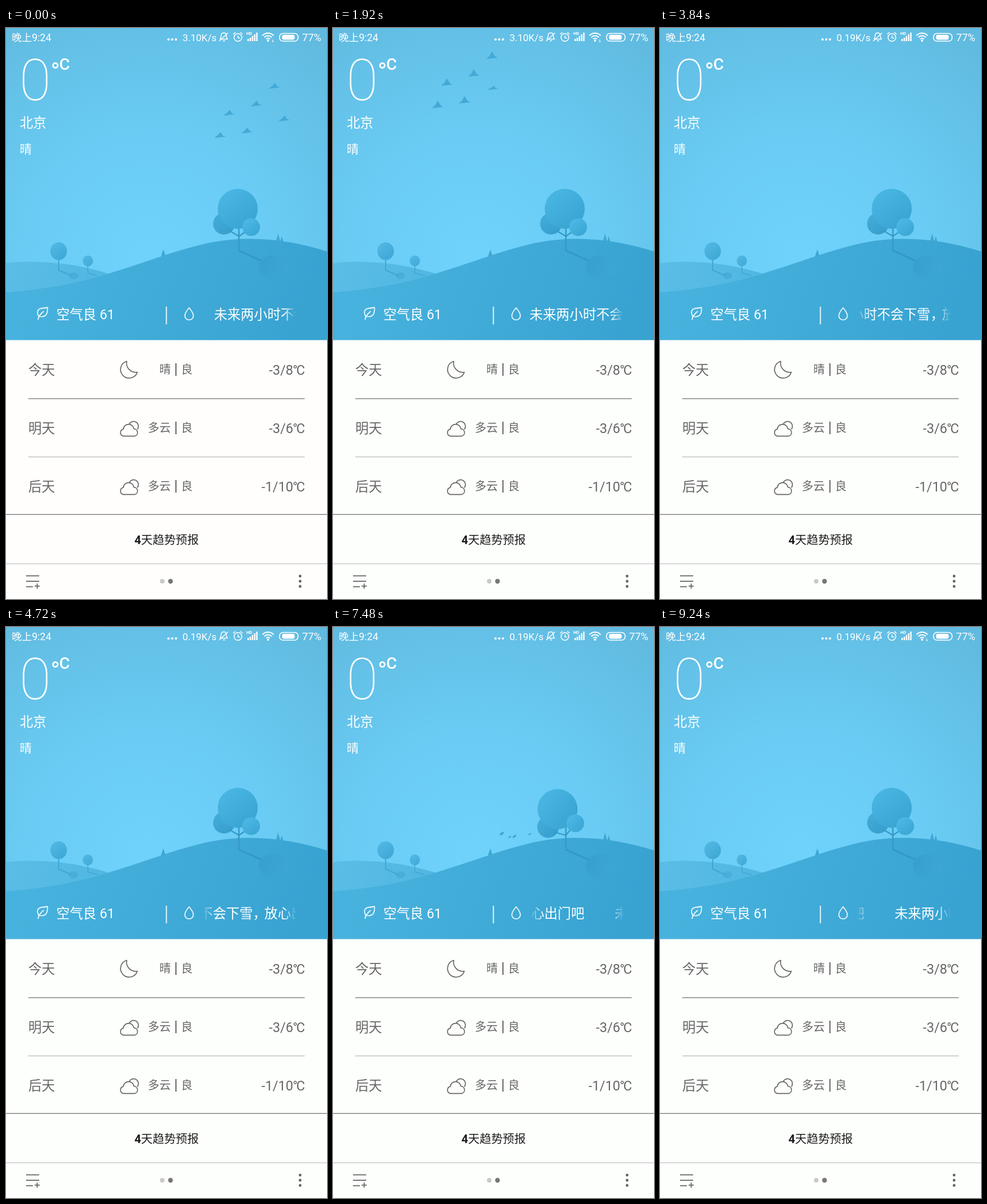
Recreate the animation shown at these times as an HTML page with a canvas. Size 561 by 998 pixels, loop 9.28 s.

```html
<!DOCTYPE html>
<html lang="zh">
<head>
<meta charset="utf-8">
<title>天气</title>
<style>
html, body { margin: 0; width: 100%; height: 100%; overflow: hidden; background: #fdfffc; }
canvas { display: block; width: 561px; height: 998px; }
</style>
</head>
<body>
<canvas id="stage" width="561" height="998"></canvas>
<script>
const LOOP = 9280, STEP = 40;
const FONT = "Roboto, 'Noto Sans CJK SC', 'Noto Sans CJK', sans-serif";
const stage = document.getElementById('stage');
const main = stage.getContext('2d');
const band = document.createElement('canvas');
band.width = 164; band.height = 44;
const bandCtx = band.getContext('2d');
let c = main;

const clamp = v => Math.max(0, Math.min(1, v));
const ease = v => { v = clamp(v); return v * v * (3 - 2 * v); };

function text(str, x, cy, size, color = '#fff', align = 'left', weight = 400) {
  c.font = `${weight} ${size}px ${FONT}`;
  c.textAlign = align;
  c.textBaseline = 'alphabetic';
  c.fillStyle = color;
  c.fillText(str, x, cy + size * 0.37);
}
function line(points, color, width = 2) {
  c.beginPath();
  points.forEach(([x, y]) => c.lineTo(x, y));
  c.strokeStyle = color;
  c.lineWidth = width;
  c.stroke();
}
function poly(points, color) {
  c.beginPath();
  points.forEach(([x, y]) => c.lineTo(x, y));
  c.fillStyle = color;
  c.fill();
}
function dot(x, y, r, color, ry = r) {
  c.beginPath();
  c.ellipse(x, y, r, ry, 0, 0, Math.PI * 2);
  c.fillStyle = color;
  c.fill();
}
function path(d, color, width) {
  c.strokeStyle = color;
  c.lineWidth = width;
  c.stroke(new Path2D(d));
}
function blend(x0, y0, x1, y1, from, to) {
  const g = c.createLinearGradient(x0, y0, x1, y1);
  g.addColorStop(0, from);
  g.addColorStop(1, to);
  return g;
}
function ball(x, y, r, from, to, ry = r) {
  dot(x, y, r, blend(x - r * .6, y - r * .8, x + r * .6, y + r * .8, from, to), ry);
}

function sky() {
  const g = c.createRadialGradient(250, 400, 20, 250, 400, 500);
  g.addColorStop(0, '#6fd2fb');
  g.addColorStop(.4, '#6accf4');
  g.addColorStop(1, '#60b9de');
  c.fillStyle = g;
  c.fillRect(0, 0, 561, 546);
}

const BIRDS = [[469, 101], [437, 132], [390, 148], [486, 158], [421, 179], [374, 187]];
function birds(t) {
  const age = Math.max(0, t - 520);
  if (age > 4000) return;
  BIRDS.forEach(([x, y], i) => {
    const lead = i === 3;
    const bx = x - age * (lead ? .1475 : .1365);
    const by = y - age * (.0242 + age * 9.75e-6) - (lead ? 4e-6 * Math.max(0, age - 1000) ** 2 : 0);
    const flap = Math.sin(age / 432 * Math.PI * 2) * (lead ? -1 : 1);
    const top = by - 5 - 2 * flap;
    poly([[bx - 10, by + 5 + flap], [bx - 4, by + .5], [bx + 1 - flap, top],
      [bx + 5, by + 1], [bx + 10, by + 3 + flap], [bx, by + 4 + flap]], '#43a9d6');
  });
}

function hills() {
  c.fillStyle = blend(0, 410, 170, 440, '#5abde6', '#51b7e2');
  c.fill(new Path2D('M0 411 C60 404 125 412 185 431 L185 470 H0Z'));
  const trunk = '#40a7d4';
  line([[92, 400], [92, 423], [114, 433]], trunk, 2);
  dot(118, 433, 8, 'rgba(62,166,211,.55)', 6);
  ball(92, 390, 14.5, '#50b7e3', '#40a8d6', 15.5);
  line([[143, 412], [143, 428], [160, 433]], trunk, 1.5);
  ball(143, 407, 9, '#50b7e3', '#43abd8', 9.5);

  const fir = (x, y, w, base) => poly([[x, y], [x + w, base], [x - w, base]], '#3fa6d3');
  fir(275, 387, 5, 402);
  fir(475.5, 359, 4.5, 376);
  fir(482, 364, 3.5, 376);
  c.fillStyle = blend(60, 400, 500, 560, '#48b2de', '#38a3d1');
  c.fill(new Path2D('M0 462 C70 457 130 445 180 429 C250 408 300 386.5 360 374.5 C430 361.5 500 371 561 390.5 V546 H0Z'));
}

const LEAVES = [[295, 361, 5], [309, 367, 3.2], [317, 366, 4.6], [344, 362, 3.2]];
function leaves(t) {
  if (t < 6500 || t > 8500) return;
  const age = t - 7480;
  LEAVES.forEach(([x, y, r], i) => {
    const lx = x - age * .09;
    if (lx > 380) return;
    c.save();
    c.globalAlpha = clamp((8500 - t) / 400);
    c.translate(lx, y + age * .014 + Math.sin(age / 260 + i) * 2 - Math.sin(i) * 2);
    c.rotate(-.65 + age * .0006);
    c.beginPath();
    c.moveTo(-r, 0);
    c.quadraticCurveTo(0, -r * .95, r, 0);
    c.quadraticCurveTo(0, r * .95, -r, 0);
    c.fillStyle = '#42a9d6';
    c.fill();
    c.restore();
  });
}

function bigTree(t) {
  const bark = '#3599c7';
  line([[407, 389], [447, 407]], 'rgba(48,148,194,.8)', 2.5);
  dot(468, 418, 26, blend(442, 400, 494, 425, '#369fcd', '#3ca6d4'), 21);
  const lean = ease((t - 5500) / 600) - ease((t - 8200) / 700);
  const rotated = draw => {
    c.save();
    c.translate(407, 365);
    c.rotate(-lean * Math.PI / 12);
    draw();
    c.restore();
  };
  rotated(() => ball(-26, -23, 19, '#42abd8', '#379fcd'));
  line([[407, 343], [407, 390]], bark, 2.5);
  rotated(() => {
    line([[-17, -11], [0, -1], [16, -12]], bark, 2.2);
    ball(-2, -49, 35, '#48b5e2', '#3aa4d2');
    ball(21.5, -17, 15.5, '#4bb7e4', '#3ca7d5');
  });
}

function statusBar(t) {
  const w = '#fff';
  text('晚上9:24', 10, 16.5, 17.6);
  [284, 290.5, 297].forEach(x => dot(x, 20, 2.1, w));
  text(t < 2440 ? '3.10K/s' : '0.19K/s', 368, 16.5, 17, w, 'right');

  path('M374 19.5 H387 Q385 17 385 13 Q385 8.5 380.5 8.5 Q376 8.5 376 13 Q376 17 374 19.5 M379 22.5 H383 M372.5 23 L388 8.5', w, 1.4);
  path('M398.5 16.5 a6.8 6.8 0 1 0 13.6 0 a6.8 6.8 0 1 0 -13.6 0 M405.5 13 V17.5 H409 M397 11 L401 7.5 M409.5 7.5 L413.5 11', w, 1.5);
  text('HD', 420, 9.5, 7.5, w, 'left', 700);
  for (let i = 0; i < 5; i++) {
    const h = [4, 6, 9, 12, 15][i];
    c.fillRect(422 + i * 3.8, 23 - h, 2.4, h);
  }
  [4.5, 9, 13.5].forEach(r => {
    c.beginPath();
    c.arc(458, 22.5, r, -Math.PI * .76, -Math.PI * .24);
    c.strokeStyle = w;
    c.lineWidth = 2;
    c.stroke();
  });
  dot(458, 22, 2, w);
  if (t < 2400 || t > 9000 || (t > 6100 && t < 6500)) line([[466, 20], [466, 24.5], [468, 23]], w, 1);
  c.beginPath();
  c.roundRect(478, 9.5, 32.5, 13.5, 6);
  c.lineWidth = 1.6;
  c.stroke();
  c.beginPath();
  c.roundRect(482.5, 12, 22, 8.5, 3);
  c.fillStyle = w;
  c.fill();
  text('77%', 551, 16.5, 18, w, 'right');
}

function current() {
  text('0', 51, 88.5, 101, '#fff', 'center', 200);
  text('°', 78, 75.5, 44);
  text('C', 93, 62.5, 28.5, '#fff', 'left', 500);
  text('北京', 24, 165, 23.3);
  text('晴', 24, 211, 21);

  path('M56 510 Q57 502 66 495 M57.5 505 Q51 492 62 490 Q67 489.5 72.5 488.5 Q73 498 69.5 502 Q65 506 58.5 504', '#e8f6fc', 1.8);
  text('空气良 61', 88, 500, 23.3);
  c.fillStyle = 'rgba(255,255,255,.85)';
  c.fillRect(279.3, 487, 2, 31);
  path('M320 489 Q312.5 498 312.5 503 A7.5 7.2 0 0 0 327.5 503 Q327.5 498 320 489Z', '#e8f6fc', 1.8);
}

// The line slides home, rests, then scrolls on with a second copy behind it.
function tickerX(t) {
  const speed = .0467;
  if (t < 2110) return Math.max(344, 364 - Math.max(0, t - 480) * speed);
  return 344 - (t - 2110) * speed;
}
function ticker(t) {
  const x = tickerX(t) - 344;
  c = bandCtx;
  c.globalCompositeOperation = 'source-over';
  c.clearRect(0, 0, band.width, band.height);
  [x - .5, x + 399].forEach(start => {
    text('未来两小时不会下雪', start, 22, 23.3);
    text('，', start + 210, 22, 23.3);
    text('放心出门吧', start + 230, 22, 23.3);
  });
  const fade = c.createLinearGradient(0, 0, band.width, 0);
  const edge = 23 / band.width;
  fade.addColorStop(0, `rgba(0,0,0,${1 - clamp(-x / 20)})`);
  fade.addColorStop(edge, '#000');
  fade.addColorStop(1 - edge, '#000');
  fade.addColorStop(1, 'rgba(0,0,0,0)');
  c.globalCompositeOperation = 'destination-in';
  c.fillStyle = fade;
  c.fillRect(0, 0, band.width, band.height);
  c = main;
  c.drawImage(band, 344, 478);
}

function moon() {
  path('M211 582.5 A15 15 0 1 0 229.5 601.5 A16 16 0 0 1 211 582.5Z', '#666', 1.7);
}
function cloud(y) {
  c.save();
  c.translate(0, y - 699);
  path('M205 713.3 H225 A6.4 6.4 0 0 0 223.5 700.7 A9.3 9.3 0 0 0 205 701.2 A6.2 6.2 0 0 0 205 713.3Z M215.5 692 A8.5 8.5 0 1 1 229.5 701.5', '#666', 1.7);
  c.restore();
}

const DAYS = [['今天', '晴', '-3/8℃', 597], ['明天', '多云', '-3/6℃', 699], ['后天', '多云', '-1/10℃', 801]];
function forecast(t) {
  c.fillStyle = t < 520 ? '#fffefd' : '#fdfffc';
  c.fillRect(0, 545.5, 561, 453);
  const grey = '#666';
  DAYS.forEach(([day, weather, range, y], i) => {
    text(day, 39, y, 23.3, grey);
    i ? cloud(y) : moon();
    text(weather, 288, y, 20, grey, 'right');
    c.fillRect(296, y - 11, 2, 22);
    text('良', 306, y, 20, grey);
    text(range, 522.5, y, 23.4, grey, 'right');
  });
  const rule = (x, y, w, color, h = 1) => { c.fillStyle = color; c.fillRect(x, y, w, h); };
  rule(39, 647.2, 483, '#777', 1.3);
  rule(39, 749.2, 483, '#a5aaa8');
  rule(0, 849.6, 561, '#7f7f7f', 1.4);
  rule(0, 936, 561, '#b8b8b8');
  text('4', 236, 895, 20.2, '#1c1c1c', 'right', 700);
  text('天趋势预报', 236, 895, 20.2, '#1c1c1c');

  line([[35, 957.5], [58, 957.5]], grey, 1.8);
  line([[35, 967], [58, 967]], grey, 1.8);
  line([[35, 976.5], [47, 976.5]], grey, 1.8);
  line([[50, 975.5], [59, 975.5]], grey, 1.8);
  line([[54.5, 971], [54.5, 980]], grey, 1.8);
  dot(273, 967, 4, '#c9c9c9');
  dot(287.5, 967, 4.2, '#777');
  [958, 967, 976].forEach(y => dot(514, y, 2.4, grey));
}

function render(now) {
  const t = Math.floor((now % LOOP) / STEP) * STEP;
  c.lineCap = 'butt';
  c.lineJoin = 'round';
  sky();
  birds(t);
  leaves(t);
  hills();
  bigTree(t);
  statusBar(t);
  current();
  ticker(t);
  forecast(t);
}

const begin = performance.now();
function tick() {
  render(performance.now() - begin);
  requestAnimationFrame(tick);
}
tick();
</script>
</body>
</html>
```
